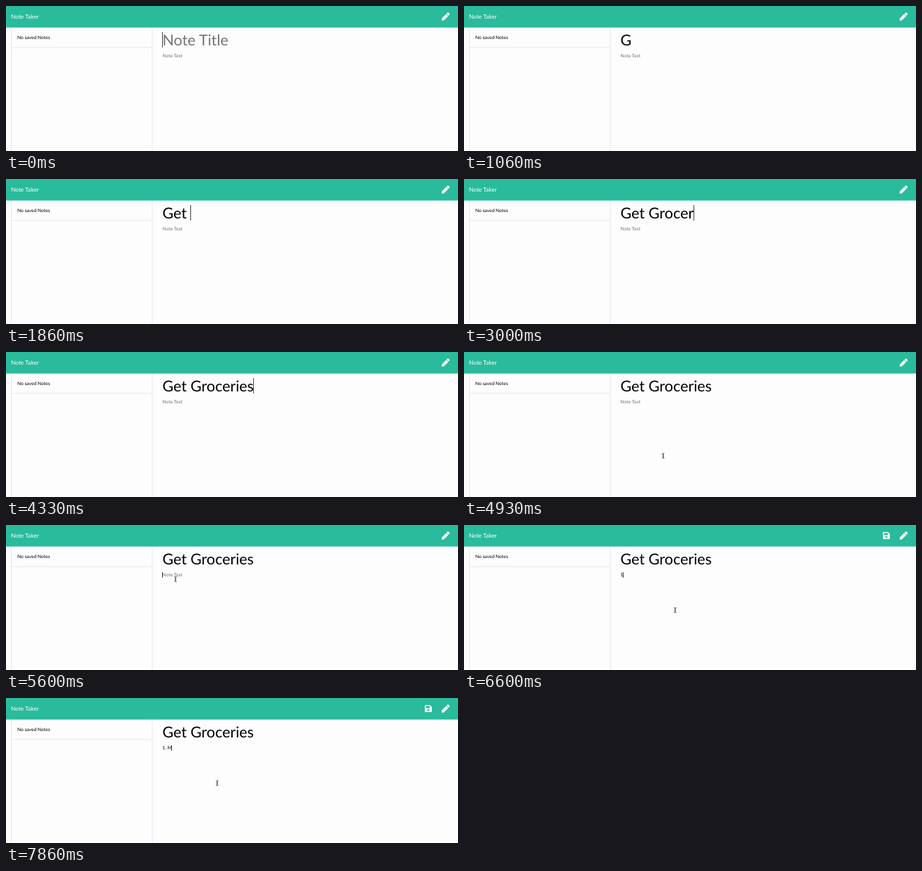
An HTML page with a canvas for the animation above (8000 ms loop, 640 by 206 pixels).

```html
<!DOCTYPE html>
<html lang="en">
<head>
<meta charset="utf-8">
<title>Note Taker</title>
<style>
  html, body { margin: 0; width: 100%; height: 100%; overflow: hidden; background: #fdfdfe; }
  canvas { display: block; width: 640px; height: 206px; }
</style>
</head>
<body>
<canvas id="stage"></canvas>
<script>
const WIDTH = 640, HEIGHT = 206, LOOP = 8000;
const GREEN = '#29bb9b', INK = '#000', HINT = '#737373', RULE = '#e6e8eb', ICON = '#f8fdfc';

const canvas = document.getElementById('stage');
const ctx = canvas.getContext('2d');
const ratio = window.devicePixelRatio || 1;
canvas.width = WIDTH * ratio;
canvas.height = HEIGHT * ratio;
ctx.scale(ratio, ratio);
ctx.textRendering = 'geometricPrecision';

// [start, typed text, caret visible]
const titleSteps = [
  [0, '', true], [130, '', false], [530, 'G', true], [1060, 'G', false],
  [1260, 'Ge', true], [1400, 'Get', true], [1860, 'Get ', true], [2130, 'Get G', true],
  [2530, 'Get Gr', true], [2660, 'Get Gro', true], [2800, 'Get Groc', true],
  [3000, 'Get Grocer', true], [3260, 'Get Groceri', true], [3400, 'Get Grocerie', true],
  [3800, 'Get Grocerie', false], [4330, 'Get Groceries', true],
  [4800, 'Get Groceries', false], [5400, 'Get Groceries', true], [5530, 'Get Groceries', false]
];
const bodySteps = [
  [0, '', false], [5530, '', true], [6130, '', false], [6600, '1', true],
  [7000, '1.', true], [7260, '1. ', true], [7860, '1. M', true]
];
// [start, x, y]
const pointerSteps = [
  [4800, 282, 147.5], [5000, 276, 134], [5130, 260, 107], [5260, 248, 89],
  [5400, 243, 81], [5530, 240, 77], [6000, 248, 82], [6130, 265, 94],
  [6260, 284, 109], [6330, 293, 117], [6460, 299, 121]
];

function stepAt(steps, time) {
  let current = null;
  for (const step of steps) if (time >= step[0]) current = step;
  return current;
}

function write(text, x, baseline, size, color) {
  ctx.font = `${size}px Lato, sans-serif`;
  ctx.fillStyle = color;
  ctx.fillText(text, x, baseline);
}

function fillBox(x, y, w, h, color) {
  ctx.fillStyle = color;
  ctx.fillRect(x, y, w, h);
}

function drawField([, text, caret], hint, x, baseline, size, caretTop, caretHeight) {
  write(text || hint, x, baseline, size, text ? INK : HINT);
  if (!caret) return;
  const end = Math.floor(x + (text ? ctx.measureText(text).width : -0.4));
  fillBox(end, caretTop, 1, caretHeight, '#444');
}

function drawPencil(x, y) {
  ctx.save();
  ctx.translate(x, y);
  ctx.fillStyle = ICON;
  ctx.beginPath();
  ctx.moveTo(6.5, 2.1);
  ctx.lineTo(9.4, 5);
  ctx.lineTo(3.2, 11.2);
  ctx.lineTo(0.6, 11.5);
  ctx.quadraticCurveTo(-0.1, 11.5, 0, 10.8);
  ctx.lineTo(0.3, 8.3);
  ctx.closePath();
  ctx.moveTo(7, 1.6);
  ctx.lineTo(8.3, 0.3);
  ctx.quadraticCurveTo(9.1, -0.3, 9.8, 0.3);
  ctx.lineTo(11.2, 1.7);
  ctx.quadraticCurveTo(11.8, 2.4, 11.2, 3.2);
  ctx.lineTo(9.9, 4.5);
  ctx.closePath();
  ctx.fill();
  ctx.restore();
}

function drawDisk(x, y) {
  ctx.save();
  ctx.translate(x, y);
  ctx.fillStyle = ICON;
  ctx.beginPath();
  ctx.moveTo(1, 0);
  ctx.lineTo(7.2, 0);
  ctx.lineTo(10, 2.8);
  ctx.arcTo(10, 10, 9, 10, 1);
  ctx.arcTo(0, 10, 0, 9, 1);
  ctx.arcTo(0, 0, 1, 0, 1);
  ctx.closePath();
  ctx.rect(1.4, 1.4, 5.8, 2.9);
  ctx.moveTo(6.5, 7.1);
  ctx.arc(5, 7.1, 1.5, 0, Math.PI * 2);
  ctx.fill('evenodd');
  ctx.restore();
}

function drawPointer(x, y) {
  ctx.beginPath();
  for (const side of [-1, 1]) {
    ctx.moveTo(x + side * 1.7, y - 3.5);
    ctx.quadraticCurveTo(x, y - 3.5, x, y - 2.6);
    ctx.lineTo(x, y + 2.6);
    ctx.quadraticCurveTo(x, y + 3.5, x + side * 1.7, y + 3.5);
  }
  ctx.strokeStyle = 'rgba(255,255,255,.7)';
  ctx.lineWidth = 1.6;
  ctx.stroke();
  ctx.strokeStyle = '#333';
  ctx.lineWidth = 0.8;
  ctx.stroke();
}

function draw(time) {
  const title = stepAt(titleSteps, time);
  const body = stepAt(bodySteps, time);
  const pointer = stepAt(pointerSteps, time);

  fillBox(0, 0, WIDTH, HEIGHT, '#fdfdfe');
  fillBox(0, 0, WIDTH, 30.6, GREEN);
  write('Note Taker', 7, 18.3, 8.33, '#fff');
  drawPencil(616.8, 9.2);
  if (body[1]) drawDisk(593, 10);

  fillBox(7, 31, 1, HEIGHT, RULE);
  fillBox(206.5, 31, 1, HEIGHT, RULE);
  fillBox(7, 58.5, 200, 1, RULE);
  write('No saved Notes', 16, 47.3, 6.67, INK);

  drawField(title, 'Note Title', 221.6, 55.8, 21.33, 37, 22);
  drawField(body, 'Note Text', 221.6, 73.4, 6.67, 67, 8);
  if (pointer) drawPointer(pointer[1], pointer[2]);
}

const start = performance.now();
function tick() {
  draw((performance.now() - start) % LOOP);
  requestAnimationFrame(tick);
}
tick();
</script>
</body>
</html>
```
